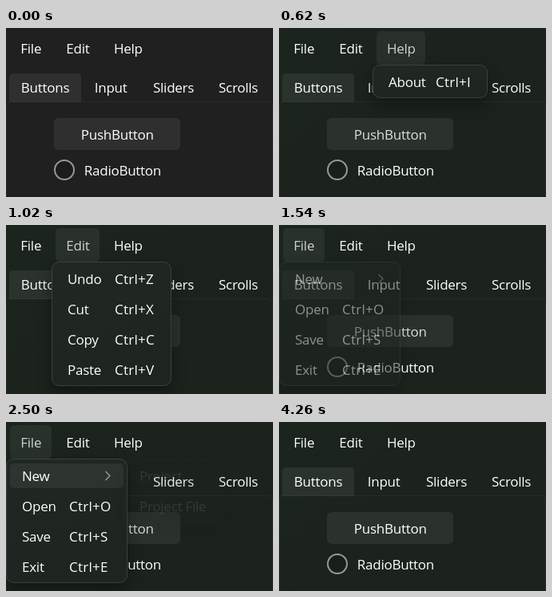
An HTML page for the animation above (4.42 s loop, 334 px wide and 212 px high).

```html
<!DOCTYPE html>
<html lang="en">
<head>
<meta charset="utf-8">
<title>Menu demo</title>
<style>
html, body { margin: 0; width: 100%; height: 100%; overflow: hidden; background: #202020; }
svg { display: block; width: 100%; height: 100%; }
text { font: 17px "Open Sans", "Noto Sans", sans-serif; letter-spacing: -.26px; fill: #fff; white-space: pre; }
.keys { letter-spacing: .25px; }
.popup { filter: drop-shadow(0 8px 9px rgba(0, 0, 0, .36)); }
</style>
</head>
<body>
<svg id="stage" viewBox="0 0 334 212" xmlns="http://www.w3.org/2000/svg">
  <defs>
    <linearGradient id="tint" x2="1" y2=".6">
      <stop offset="0" stop-color="#1b241d"/>
      <stop offset="1" stop-color="#1c221c"/>
    </linearGradient>
    <linearGradient id="sheet" x2=".3" y2="1">
      <stop offset="0" stop-color="#212824"/>
      <stop offset="1" stop-color="#1e2420"/>
    </linearGradient>
  </defs>
  <rect width="334" height="212" fill="#202020"/>
</svg>
<script>
const LOOP = 4420;
const stage = document.getElementById('stage');

function add(parent, tag, attrs, label) {
  const node = document.createElementNS('http://www.w3.org/2000/svg', tag);
  for (const key in attrs) node.setAttribute(key, attrs[key]);
  if (label) node.textContent = label;
  parent.appendChild(node);
  return node;
}
const box = (parent, x, y, width, height, rx, attrs) =>
  add(parent, 'rect', { x, y, width, height, rx, ...attrs });
const write = (parent, x, y, label, attrs) =>
  add(parent, 'text', { x, y, ...attrs }, label);
const veil = alpha => ({ fill: '#fff', 'fill-opacity': alpha });

// Window
const tint = box(stage, 0, 0, 334, 212, 0, { fill: 'url(#tint)' });
box(stage, .5, 92.5, 333, 130, 6, {
  fill: 'none', stroke: '#fff', 'stroke-opacity': .045
});
add(stage, 'path', { d: 'M4 93V62q0-5 5-5H89q5 0 5 5V93Z', ...veil(.068) });
[['Buttons', 18.8], ['Input', 110.8], ['Sliders', 184], ['Scrolls', 266]]
  .forEach(([label, x]) => write(stage, x, 81, label));

box(stage, 60.5, 113.5, 157, 39, 5, {
  ...veil(.068), stroke: '#fff', 'stroke-opacity': .045
});
const push = write(stage, 93.8, 140, 'PushButton');
add(stage, 'circle', {
  cx: 73, cy: 178, r: 12, fill: '#000', 'fill-opacity': .1,
  stroke: '#fff', 'stroke-opacity': .54, 'stroke-width': 2
});
write(stage, 97.8, 185, 'RadioButton');

// Menu bar: label, text x, box x, box width, hover start, open, hover end
const bar = [
  ['File', 18.3, 5, 52, 1540, 1540, 4260],
  ['Edit', 75.3, 62, 55, 930, 930, 1540],
  ['Help', 135, 122, 61, 180, 410, 930]
].map(([label, x, left, width, from, open, to]) => ({
  back: box(stage, left, 4, width, 42, 5, veil(.06)),
  text: write(stage, x, 32, label),
  from, open, to
}));

function popup(x, width, items, timing) {
  const group = add(stage, 'g', { class: 'popup' });
  const height = items.length * 38 + 4;
  box(group, x + .5, 46.5, width - 1, height - 1, 9, {
    fill: 'url(#sheet)', stroke: '#3b423d'
  });
  const mark = box(group, x + 5, 52, width - 10, 31, 5, { ...veil(.06), opacity: 0 });
  items.forEach(([label, keys], i) => {
    const y = 74 + i * 38;
    write(group, x + 20, y, label);
    if (keys) write(group, x + 79, y, keys, { class: 'keys' });
  });
  return { group, mark, ...timing };
}

const edit = popup(57, 150,
  [['Undo', 'Ctrl+Z'], ['Cut', 'Ctrl+X'], ['Copy', 'Ctrl+C'], ['Paste', 'Ctrl+V']],
  { from: 930, full: 1020, steps: 2, first: .5, to: 1540 });
const help = popup(117, 144, [['About', 'Ctrl+I']],
  { from: 410, full: 620, steps: 6, first: .1, to: 930 });
const file = popup(0, 152,
  [['New'], ['Open', 'Ctrl+O'], ['Save', 'Ctrl+S'], ['Exit', 'Ctrl+E']],
  { from: 1540, full: 1610, steps: 2, first: .5, to: 4260 });
add(file.group, 'path', {
  d: 'M124.5 62l5.5 5.5-5.5 5.5', fill: 'none', stroke: '#a0a4a1', 'stroke-width': 1.2
});
const project = popup(147, 124, [['Project'], ['Project File']],
  { from: 2500, full: 2660, steps: 5, first: .1, to: 4260 });
const popups = [edit, help, file, project];

// Stepped fade, reaching 1 on its last step
function fade(t, { from, full, steps, first }) {
  if (t < from) return 0;
  const step = Math.floor((t - from) / (full - from) * (steps - 1) + .001);
  return first + (1 - first) * Math.min(1, step / (steps - 1));
}

function draw(t) {
  tint.setAttribute('opacity', fade(t, help));
  push.setAttribute('fill-opacity', t >= 410 && t < 4260 ? .84 : 1);
  for (const m of bar) {
    m.back.setAttribute('opacity', t >= m.from && t < m.to ? 1 : 0);
    m.text.setAttribute('fill-opacity', t >= m.open && t < m.to ? .78 : 1);
  }
  for (const p of popups) {
    const level = t < p.to ? fade(t, p) : 0;
    p.group.setAttribute('opacity', level);
    p.group.setAttribute('visibility', level ? 'visible' : 'hidden');
  }
  file.mark.setAttribute('opacity', t >= 2500 ? 1 : 0);
}

const start = performance.now();
function tick() {
  draw((performance.now() - start) % LOOP);
  requestAnimationFrame(tick);
}
tick();
</script>
</body>
</html>
```
